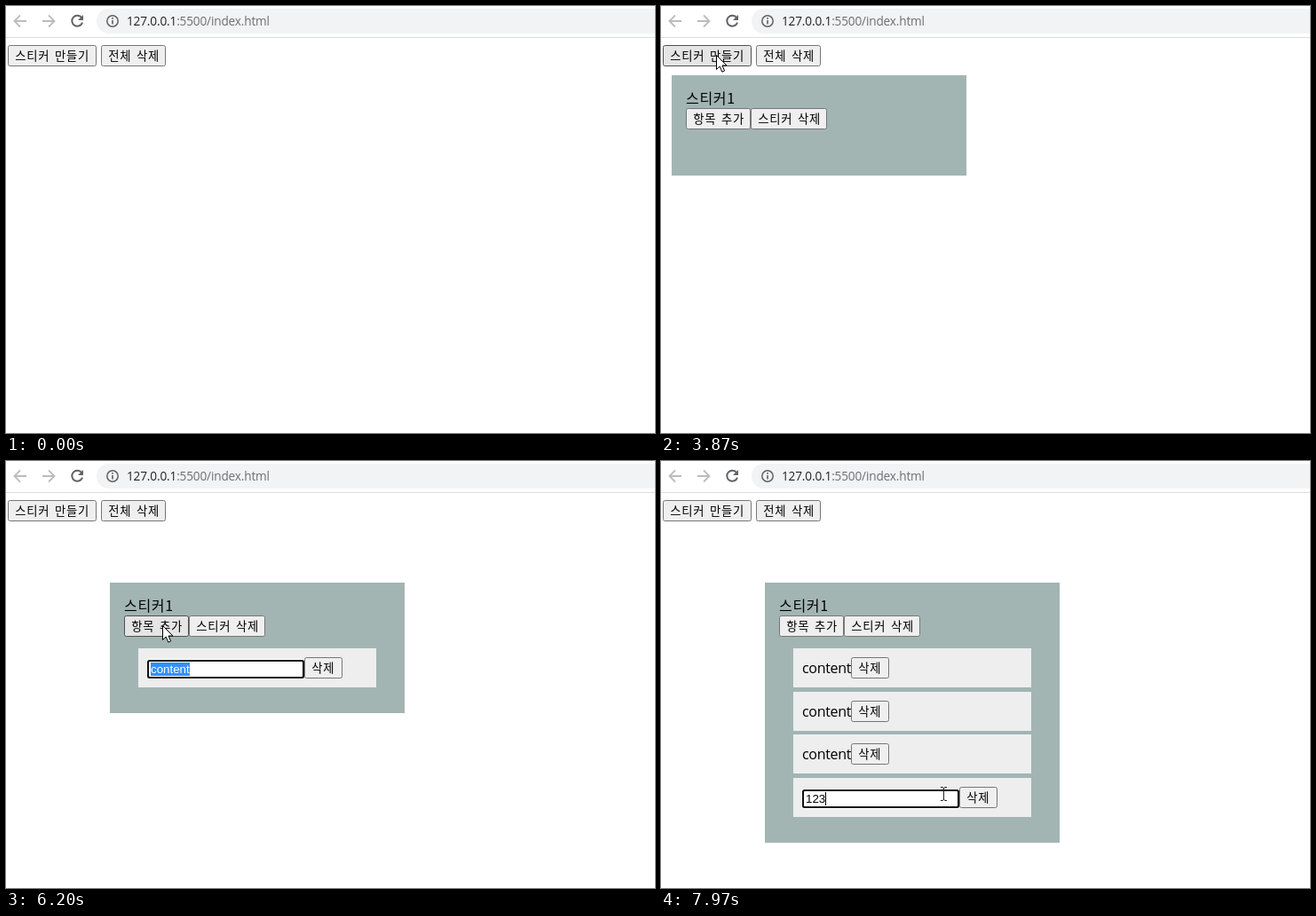
An HTML page that plays this animation: 731x481 px, repeating every 8000 ms.

```html
<!DOCTYPE html>
<html lang="ko">
<head>
<meta charset="utf-8">
<title>Sticker board</title>
<style>
  html, body { margin: 0; width: 100%; height: 100%; overflow: hidden; background: #fff; }
  svg { display: block; width: 731px; height: 481px; }
  text { white-space: pre; }
  .label { font: 13.33px "Noto Sans CJK KR", "Noto Sans CJK", sans-serif; letter-spacing: .73px; word-spacing: 1.3px; }
  .title { font: 16px "Noto Sans CJK KR", "Noto Sans CJK", sans-serif; letter-spacing: .7px; }
  .body { font: 16px "Open Sans", sans-serif; letter-spacing: -.3px; }
  .field { font: 13.33px "Liberation Sans", Arial, sans-serif; }
  .url { font: 13.6px "Open Sans", sans-serif; letter-spacing: -.15px; }
</style>
</head>
<body>
<svg viewBox="0 0 731 481" xmlns="http://www.w3.org/2000/svg">
  <rect width="731" height="481" fill="#fff"/>
  <rect x="102" y="3" width="660" height="28" rx="14" fill="#f1f3f4"/>
  <rect y="35" width="731" height="1" fill="#dadce0"/>
  <g fill="none" stroke-width="1.8">
    <path d="M23 17H10M16 10.5L9.5 17L16 23.5" stroke="#babcbe"/>
    <path d="M41 17H54M48 10.5L54.5 17L48 23.5" stroke="#babcbe"/>
    <path d="M85.2 13.2A6 6 0 1 0 86 18.6" stroke="#5f6368" stroke-width="2"/>
    <path d="M87 10V16H81Z" fill="#5f6368"/>
    <circle cx="120" cy="17" r="6.2" stroke="#5f6368" stroke-width="1.5"/>
    <path d="M120 16V20.5M120 13V14.7" stroke="#5f6368" stroke-width="1.6"/>
  </g>
  <text class="url" x="136" y="22" fill="#202124">127.0.0.1<tspan fill="#6b6f74">:5500/index.html</tspan></text>
  <g id="scene"></g>
</svg>
<script>
const LOOP = 8000;
const scene = document.getElementById('scene');

// Pointer moves: start, end, steps, x, y
const moves = [
  [307, 923, 9, 62, 55],
  [4730, 4880, 3, 134, 86],
  [5030, 5030, 1, 134, 84],
  [5110, 5110, 1, 181, 118],
  [5190, 5340, 3, 243, 145],
  [5590, 6050, 7, 176, 185],
  [7360, 7590, 4, 285, 390],
  [7660, 7660, 1, 318, 375]
];
const presses = [[1000, 1070], [5030, 5510], [6120, 6200], [6350, 6430], [7050, 7130]];
const itemTimes = [6200, 6430, 6580, 7130];
const titleKeys = [[2710, 'ㅅ'], [2860, '스'], [2930, '슽'], [3010, '스티'],
  [3260, '스팈'], [3410, '스티커'], [3640, '스티커1']];
const itemKeys = [[7740, '1'], [7820, '12'], [7970, '123']];

const smooth = p => p * p * (3 - 2 * p);
const typed = (keys, t) => keys.reduce((s, [at, text]) => t >= at ? text : s, '');
const rect = (x, y, w, h, fill, extra = '') =>
  `<rect x="${x}" y="${y}" width="${w}" height="${h}" fill="${fill}" ${extra}/>`;
const text = (cls, x, y, s, fill = '#000') =>
  `<text class="${cls}" x="${x}" y="${y}" fill="${fill}">${s}</text>`;

function pointerAt(t) {
  let x = 379, y = 359;
  for (const [t0, t1, n, tx, ty] of moves) {
    if (t < t0) break;
    const k = t >= t1 ? n : 1 + Math.floor((t - t0) / (t1 - t0) * (n - 1));
    const p = smooth(k / n);
    x = Math.round(x + (tx - x) * p);
    y = Math.round(y + (ty - y) * p);
  }
  return { x, y };
}

function drawPointer(kind, x, y) {
  const shapes = {
    arrow: '<path d="M.5 .5V16.5L4.2 13L6.8 19.2L9.6 18L7 12H12Z" fill="#fff" stroke="#000"/>',
    hand: '<path d="M-1.5 11V1.2Q-1.3 -.5 0 -.5Q1.5 -.5 1.6 1.2V6.5Q4 5.5 4.8 7.3Q7.3 6.4 8 8.3Q11.3 7.6 11.5 10.5V16Q11.3 19 9.5 21V23.5H.5V21.5Q-2.5 18.5 -5 14Q-6.2 11.5 -4.2 11Q-2.8 11 -1.5 13Z" fill="#fff" stroke="#000"/>' +
      '<path d="M1.6 6.5V11M4.8 7.5V11M8 8.5V11.5" stroke="#000" fill="none"/>',
    beam: '<path d="M-3 -7.5H-1L.5 -6.5L2 -7.5H4M.5 -6.5V6.5M-3 7.5H-1L.5 6.5L2 7.5H4" stroke="#222" fill="none"/>'
  };
  return `<g transform="translate(${x} ${y})">${shapes[kind]}</g>`;
}

function render(t) {
  const shown = t >= 230;
  const ptr = pointerAt(t);
  const pressed = presses.some(([a, b]) => t >= a && t < b);
  const inside = (x, y, w, h) =>
    shown && ptr.x >= x && ptr.x < x + w && ptr.y >= y && ptr.y < y + h;
  let kind = 'arrow', out = '';

  const button = (x, y, w, label) => {
    let fill = '#efefef', line = '#767676';
    if (inside(x, y, w, 24)) {
      kind = 'arrow';
      [fill, line] = pressed ? ['#f5f5f5', '#8d8d8d'] : ['#e5e5e5', '#4f4f4f'];
    }
    out += rect(x + .5, y + .5, w - 1, 23, fill, `rx="2" stroke="${line}"`) +
      text('label', x + 8.3, y + 17, label);
  };

  const field = (x, y, initial, selWidth, value) => {
    if (inside(x, y, 177, 21)) kind = 'beam';
    out += rect(x - 1, y - 1, 179, 23, '#fff', 'rx="3.5"') +
      rect(x, y, 177, 21, '#101010', 'rx="2.5"') +
      rect(x + 2, y + 2, 173, 17, '#fff', 'rx="1"');
    if (!value) {
      out += rect(x + 4, y + 3, selWidth, 15, '#3390ff') + text('field', x + 4, y + 15, initial, '#fff');
      return;
    }
    const width = [...value].reduce((w, c) => w + (c < 'A' ? 7.4 : 13), 0);
    out += text(value > '\u3000' ? 'label' : 'field', x + 4, y + 15, value) +
      rect(x + 4 + Math.floor(width), y + 3, 1, 15, '#000');
  };

  button(2, 44, 100, '스티커 만들기');
  button(107, 44, 73, '전체 삭제');

  if (t >= 1070) {
    let x = 12, y = 78;
    if (t >= 5340) { x = 117; y = 137; }
    else if (t >= 5110) { x = ptr.x - 126; y = ptr.y - 8; }
    const count = itemTimes.filter(at => t >= at).length;
    const height = count ? Math.round(146.8 + 48.6 * (count - 1)) : 113;
    if (inside(x, y, 332, height)) kind = 'hand';
    out += rect(x, y, 332, height, '#a2b5b3');

    if (t < 3870) field(x + 16, y + 16, 'Sticker', 41, typed(titleKeys, t));
    else out += text('title', x + 16, y + 32, '스티커1');
    button(x + 16, y + 37, 73, '항목 추가');
    button(x + 89, y + 37, 86, '스티커 삭제');

    for (let i = 0; i < count; i++) {
      const ix = x + 32, iy = y + Math.round(74 + 48.6 * i);
      const editing = i === count - 1;
      out += rect(ix, iy, 268, 44, '#eee');
      if (editing) field(ix + 10, iy + 13, 'content', 44, typed(itemKeys, t));
      else out += text('body', ix + 10, iy + 28, 'content');
      button(ix + (editing ? 187 : 65), iy + 10, 43, '삭제');
    }
  }

  if (shown) {
    if (pressed) out += `<circle cx="${ptr.x}" cy="${ptr.y + .5}" r="12.5" fill="#f5f500" fill-opacity=".55"/>`;
    out += drawPointer(kind, ptr.x, ptr.y);
  }
  return out;
}

let last = '';
const start = performance.now();
function tick() {
  const markup = render((performance.now() - start) % LOOP);
  if (markup !== last) scene.innerHTML = last = markup;
  requestAnimationFrame(tick);
}
tick();
</script>
</body>
</html>
```
